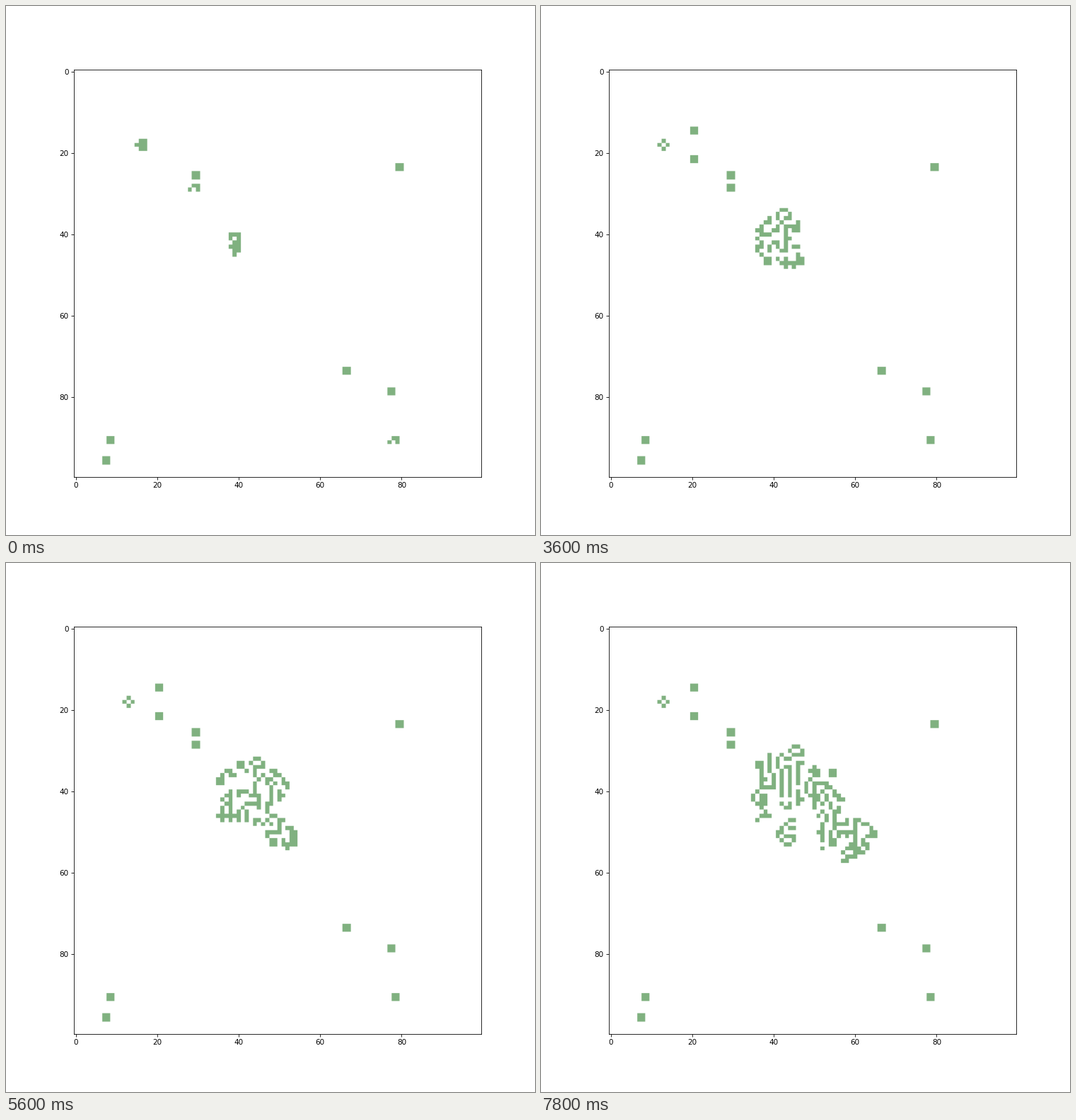
Recreate the animation shown at these times as a matplotlib script. Size 748 by 748 pixels, loop 8 s.

```python
import numpy as np
import matplotlib.pyplot as plt
from matplotlib.animation import FuncAnimation
from matplotlib.colors import LinearSegmentedColormap

SIZE = 100
FRAMES = 40
INTERVAL = 200

# Cells are laid out on a fine 1000 px stage, then smoothly scaled down.
STAGE, FIELD = 1000, 770
LEFT, TOP = 128, 120

BLOCK = ["XX", "XX"]
HOOK = [".XX", "X.X"]
ARROW = [".XX", "XXX", ".XX"]
SEED = ["XXX", "X.X", ".XX", "XXX", ".XX", ".X."]

# (row, column, pattern) of every colony at the start
START = [
    (17, 15, ARROW), (25, 29, BLOCK), (28, 28, HOOK), (23, 79, BLOCK),
    (40, 38, SEED), (73, 66, BLOCK), (78, 77, BLOCK), (90, 77, HOOK),
    (90, 8, BLOCK), (95, 7, BLOCK),
]


def first_grid():
    grid = np.zeros((SIZE, SIZE), dtype=int)
    for row, col, pattern in START:
        for i, line in enumerate(pattern):
            for j, mark in enumerate(line):
                grid[row + i, col + j] = mark == "X"
    return grid


def step(grid):
    """Life rules applied in place, row by row: later cells see new values."""
    cells = np.pad(grid, 1).tolist()
    for r in range(1, SIZE + 1):
        up, mid, down = cells[r - 1:r + 2]
        for c in range(1, SIZE + 1):
            near = (up[c - 1] + up[c] + up[c + 1] + mid[c - 1] + mid[c + 1]
                    + down[c - 1] + down[c] + down[c + 1])
            mid[c] = int(near == 3 or (near == 2 and mid[c] == 1))
    return np.array(cells)[1:-1, 1:-1]


def raster(grid):
    index = ((np.arange(FIELD) + 0.5) * SIZE / FIELD).astype(int)
    stage = np.zeros((STAGE, STAGE), dtype=np.float32)
    stage[TOP:TOP + FIELD, LEFT:LEFT + FIELD] = grid[np.ix_(index, index)]
    return stage


grids = [first_grid()]
while len(grids) < FRAMES:
    grids.append(step(grids[-1]))

fig = plt.figure(figsize=(10, 10), dpi=74.8)
back = fig.add_axes([0, 0, 1, 1])
back.axis("off")
image = back.imshow(raster(grids[0]), vmin=0, vmax=1, interpolation="bilinear",
                    cmap=LinearSegmentedColormap.from_list(
                        "cells", ["#ffffff", "#80b180"]))

ax = fig.add_axes([0.1279, 0.11, 0.77, 0.77], facecolor="none")
ax.set(xlim=(-0.5, SIZE - 0.5), ylim=(SIZE - 0.5, -0.5),
       xticks=range(0, SIZE, 20), yticks=range(0, SIZE, 20))


def draw(frame):
    image.set_data(raster(grids[frame]))
    return [image]


anim = FuncAnimation(fig, draw, frames=FRAMES, interval=INTERVAL,
                     repeat=True, repeat_delay=0)
plt.show()
```
